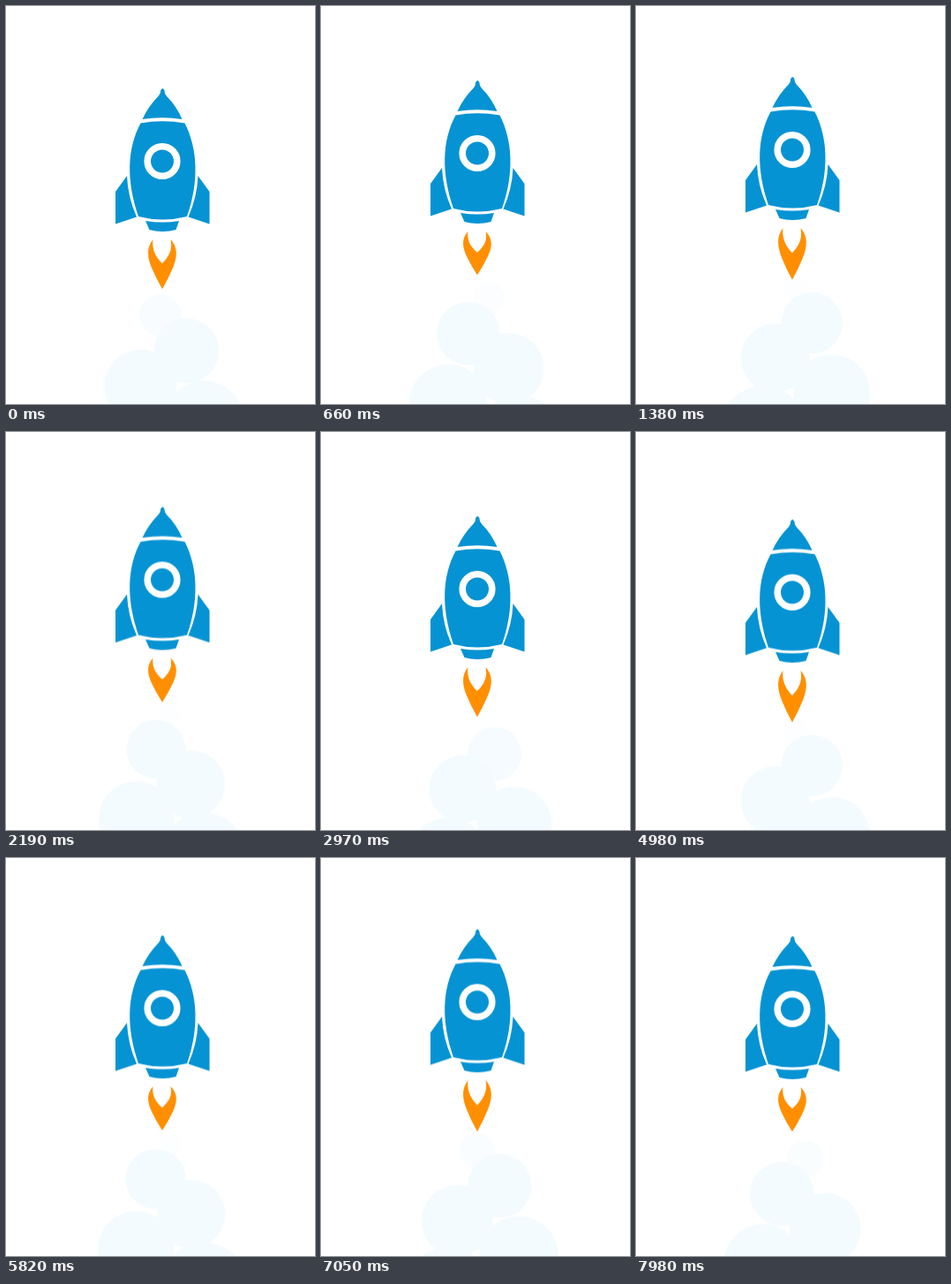
An HTML page without scripts for the animation above (8000 ms loop, 350 by 450 pixels).

```html
<!DOCTYPE html>
<html lang="en">
<head>
<meta charset="utf-8">
<title>Rocket</title>
<style>
  @property --t { syntax: "<number>"; inherits: true; initial-value: 0; }

  html, body { margin: 0; width: 100%; height: 100%; overflow: hidden; background: #fff; }
  svg { display: block; width: 350px; height: 450px; animation: clock 8s linear infinite; }

  .ship { animation: bob 8s infinite; }
  .flame { fill: #ff8f00; transform-origin: 0 264px; animation: flicker 8s cubic-bezier(.37, 0, .63, 1) infinite; }
  .hull { fill: #0693d3; }

  /* Each puff ages from its own offset: it sinks, drifts to one side and swells. */
  .smoke circle {
    --side: -1;
    --age: calc(730 + 900 * var(--k) + var(--t));
    fill: #f4fbfe;
    opacity: calc(var(--age) / 1200);
    transform:
      translate(calc((184 + var(--side) * min(40, .0125 * var(--age))) * 1px),
                calc((318 + .044 * var(--age)) * 1px))
      scale(max(0, min(6 + .0245 * var(--age), 29 + .0048 * var(--age))));
  }
  .smoke circle:nth-child(odd) { --side: 1; }

  @keyframes clock { from { --t: 0; } to { --t: 8000; } }

  @keyframes bob {
    0% { transform: translateY(0); animation-timing-function: cubic-bezier(.39, .575, .565, 1); }
    17.75% { transform: translateY(-13px); animation-timing-function: cubic-bezier(.37, 0, .63, 1); }
    51.5% { transform: translateY(11.3px); animation-timing-function: cubic-bezier(.37, 0, .63, 1); }
    85.25% { transform: translateY(-13px); animation-timing-function: cubic-bezier(.47, 0, .745, .715); }
    100% { transform: translateY(-4.7px); }
  }

  @keyframes flicker {
    0% { transform: scaleY(1); animation-timing-function: cubic-bezier(.39, .575, .565, 1); }
    7.25%, 29.75%, 52.25%, 74.75% { transform: scaleY(.874); }
    18.5%, 41%, 63.5%, 86% { transform: scaleY(1.049); }
    97.25% { transform: scaleY(.874); animation-timing-function: cubic-bezier(.47, 0, .745, .715); }
    100% { transform: scaleY(.899); }
  }
</style>
</head>
<body>
<svg viewBox="0 0 350 450">
  <g class="ship">
    <g class="smoke">
      <circle r="1" style="--k:-9"/>
      <circle r="1" style="--k:-8"/>
      <circle r="1" style="--k:-7"/>
      <circle r="1" style="--k:-6"/>
      <circle r="1" style="--k:-5"/>
      <circle r="1" style="--k:-4"/>
      <circle r="1" style="--k:-3"/>
      <circle r="1" style="--k:-2"/>
      <circle r="1" style="--k:-1"/>
      <circle r="1" style="--k:0"/>
      <circle r="1" style="--k:1"/>
      <circle r="1" style="--k:2"/>
      <circle r="1" style="--k:3"/>
      <circle r="1" style="--k:4"/>
      <circle r="1" style="--k:5"/>
    </g>
    <path class="flame" d="M166.500 264C159 273 160 284 165 296Q170 308 177 320Q184 308 189 296C194 284 195 273 186.500 264C189 276 184 284 177 291C170 284 165 276 166.500 264Z"/>
    <g class="hull">
      <path d="M175.300 95Q177.300 91.500 179.300 95Q179.300 99 182 102Q193 113 199.500 128Q177 124.500 154.500 128Q161.500 113 172.500 102Q175.300 99 175.300 95Z"/>
      <path d="M152.500 132.500Q177 128 202.500 132.500C217 161 219 198 205 238Q177 245 150 238C136 198 137 161 152.500 132.500Z"/>
      <path d="M137 192L124 210V246.500L148 238.500Q138 216 137 192Z"/>
      <path d="M217.500 192L230.500 210V246.500L206.500 238.500Q216.500 216 217.500 192Z"/>
      <path d="M158 243Q177 246 196 243L192.500 253Q177 257 162.500 253Z"/>
    </g>
    <circle cx="177" cy="175.500" r="16.800" fill="#0693d3" stroke="#fff" stroke-width="7.600"/>
  </g>
</svg>
</body>
</html>
```
